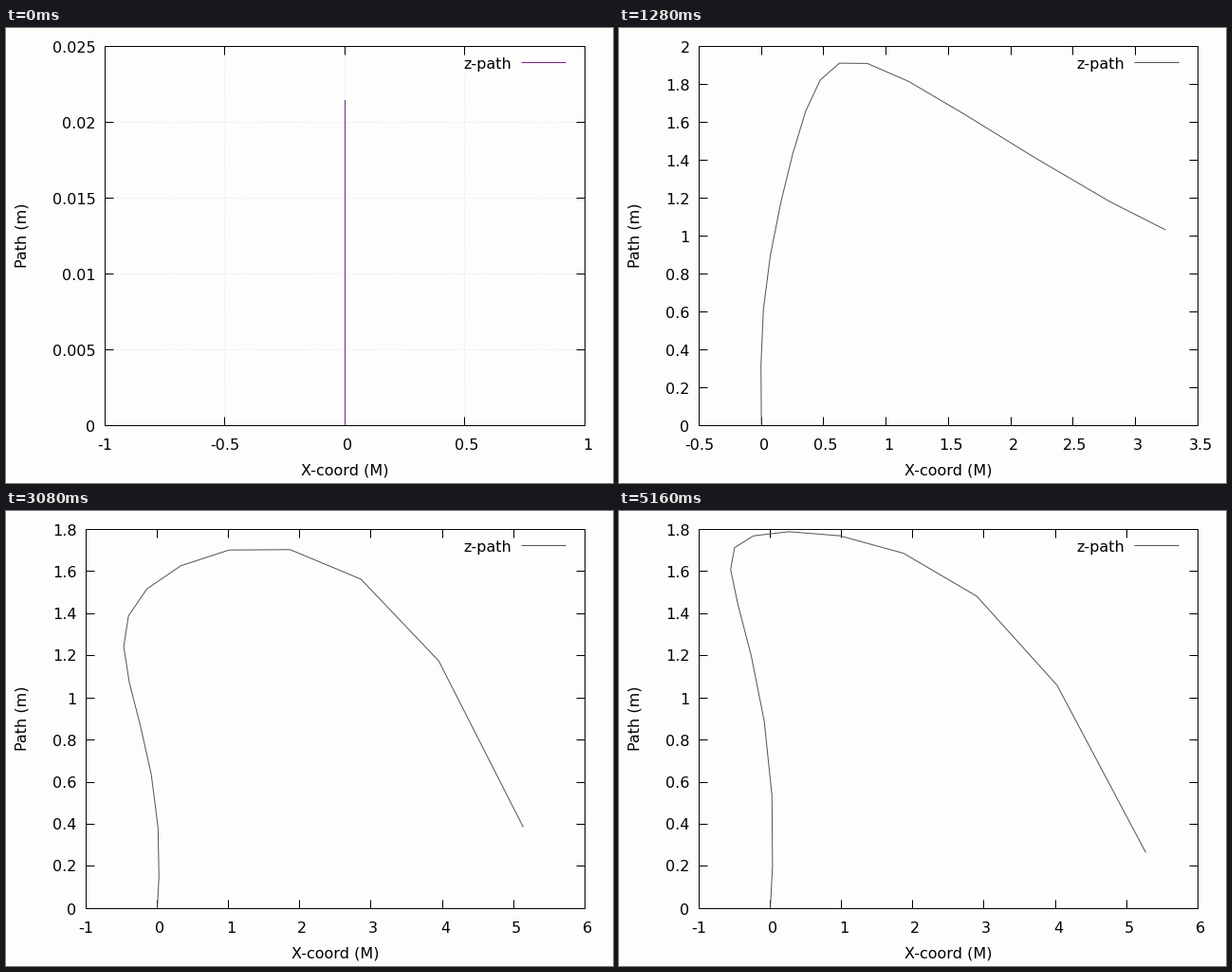
These frames come from a looping animation (640x480 px, 5.2 s). A matplotlib script:

```python
import math

import matplotlib.pyplot as plt
import numpy as np
from matplotlib.animation import FuncAnimation
from matplotlib.collections import LineCollection
from matplotlib.patches import Rectangle

W, H, DPI = 640, 480, 100
FRAMES, INTERVAL = 130, 40
PX = 72 / DPI
RIGHT, TOP, BOTTOM = 610.4, 19.4, 419.4
TICK = 9
PAPER, INK = "#fdfdfc", "#000000"
PURPLE, GREY, GRID = "#7b2590", "#5a505c", "#dedae8"

NODES = 14
U = np.arange(NODES + 1) / NODES
KNOTS = np.array([3, 6, 9, 12, 14]) / NODES


def bend(*points):
    """Smooth path through five points, clamped upright at the origin."""
    x, y = np.transpose(points)
    return np.array([U ** 2 * np.polyval(np.polyfit(KNOTS, x / KNOTS ** 2, 4), U),
                     U * np.polyval(np.polyfit(KNOTS, y / KNOTS, 4), U)])


def lift(pose, factor):
    return pose * [[1], [factor]]


START = np.array([0 * U, .02145 * U])
FALL = bend((.048, -.19), (.633, -.49), (1.725, -1.053), (3.162, -1.697), (5.012, -2.006))
WHIP = bend((.072, .898), (.355, 1.658), (.85, 1.91), (2.2, 1.41), (3.238, 1.033))
ARCH = bend((-.08, .488), (-.333, .919), (.306, 1.223), (2.712, 1.248), (4.857, .341))
RISE = bend((-.085, .637), (-.471, 1.244), (.327, 1.627), (2.856, 1.564), (5.131, .389))
REST = bend((-.085, .889), (-.557, 1.609), (.26, 1.789), (2.896, 1.483), (5.265, .268))

KEYS = np.array([0, 11, 32, 59, 77, 89, 104, 120, 129])
POSES = np.array([START, FALL, WHIP, ARCH, RISE, lift(RISE, 1.08),
                  lift(REST, .945), lift(REST, 1.045), REST])


def monotone_slopes(poses):
    d = np.diff(poses, axis=0) / np.diff(KEYS)[:, None, None]
    a, b = d[:-1], d[1:]
    same = a * b > 0
    slopes = np.zeros_like(poses)
    slopes[1:-1] = np.where(same, 2 * a * b / np.where(same, a + b, 1), 0)
    return slopes


SLOPES = monotone_slopes(POSES)


def path_at(n):
    i = min(np.searchsorted(KEYS, n, side="right") - 1, len(KEYS) - 2)
    h = KEYS[i + 1] - KEYS[i]
    s = (n - KEYS[i]) / h
    return ((1 + 2 * s) * (1 - s) ** 2 * POSES[i]
            + s * (1 - s) ** 2 * h * SLOPES[i]
            + s * s * (3 - 2 * s) * POSES[i + 1]
            + s * s * (s - 1) * h * SLOPES[i + 1])


def tick_step(span):
    power = 10 ** math.floor(math.log10(span))
    room = 20 / (span / power)
    for limit, step in ((40, .05), (20, .1), (10, .2), (4, .5), (2, 1)):
        if room > limit:
            return step * power
    return 2 * power


def ticks_for(values):
    """Tick positions whose first and last values are the axis limits."""
    lo, hi = values.min(), values.max()
    if hi - lo < 1e-9:
        lo, hi = lo - 1, hi + 1
    step = tick_step(hi - lo)
    first = math.floor(lo / step + 1e-9)
    last = math.ceil(hi / step - 1e-9)
    return np.round(np.arange(first, last + 1) * step, 10) + 0.0


def label(v):
    return f"{v: g}"


def scale(v, ticks, a, b):
    return a + (v - ticks[0]) / (ticks[-1] - ticks[0]) * (b - a)


def snap(v):
    # Just under half a pixel, so that the renderer keeps the same column.
    return np.floor(v + .01) + .4


fig = plt.figure(figsize=(W / DPI, H / DPI), dpi=DPI, facecolor=PAPER)
ax = fig.add_axes([0, 0, 1, 1])


def write(x, y, text, ha="center", **kw):
    ax.text(x, y, text, ha=ha, va="baseline", family="DejaVu Sans",
            size=16 * PX, color=INK, **kw)


def segments(lines, color, z, style="solid"):
    ax.add_collection(LineCollection(lines, colors=color, linewidths=PX,
                                     linestyles=style, zorder=z))


def draw(n):
    ax.clear()
    ax.set_axis_off()
    ax.set_xlim(0, W)
    ax.set_ylim(H, 0)

    x, y = path_at(n)
    xt, yt = ticks_for(x), ticks_for(y)
    left = 44.4 + 10 * max(len(label(v)) for v in yt)
    px = snap(scale(xt, xt, left, RIGHT))
    py = snap(scale(yt, yt, BOTTOM, TOP))

    if n == 0:
        grid = [[(p, BOTTOM), (p, TOP)] for p in px[1:-1]]
        grid += [[(left, p), (RIGHT, p)] for p in py[1:-1]]
        segments(grid, GRID, 1, (0, (1, 3)))
        ax.add_patch(Rectangle((478, 28), 126, 19, color=PAPER, lw=0, zorder=1.5))

    marks = []
    for p in px:
        marks += [[(p, BOTTOM), (p, BOTTOM - TICK)], [(p, TOP), (p, TOP + TICK)]]
    for p in py:
        marks += [[(left, p), (left + TICK, p)], [(RIGHT, p), (RIGHT - TICK, p)]]
    segments(marks, INK, 2)
    ax.add_patch(Rectangle((left, TOP), RIGHT - left, BOTTOM - TOP, fill=False,
                           ec=INK, lw=PX, zorder=4))

    # Non-negative labels carry a leading blank that shifts their centre.
    for v, p in zip(xt, px):
        write(p + (2.6 if v >= 0 else .1), 445, label(v).strip())
    for v, p in zip(yt, py):
        write(left - 9.9, p + 6.1, label(v).strip(), "right")
    write((left + RIGHT) / 2, 472, "X-coord (M)")
    write(22, 218.5, "Path (m)", rotation=90, rotation_mode="anchor")

    write(533.5, 43, "z-path", "right")
    segments([[(543, 36.4), (590.4, 36.4)]], PURPLE if n < 15 else GREY, 3)
    ax.plot(scale(x, xt, left, RIGHT), scale(y, yt, BOTTOM, TOP), lw=PX,
            color=GREY if n else PURPLE, solid_joinstyle="round", zorder=3)
    return []


anim = FuncAnimation(fig, draw, frames=FRAMES, interval=INTERVAL,
                     init_func=lambda: [], repeat=True, repeat_delay=0, blit=False)
plt.show()
```
